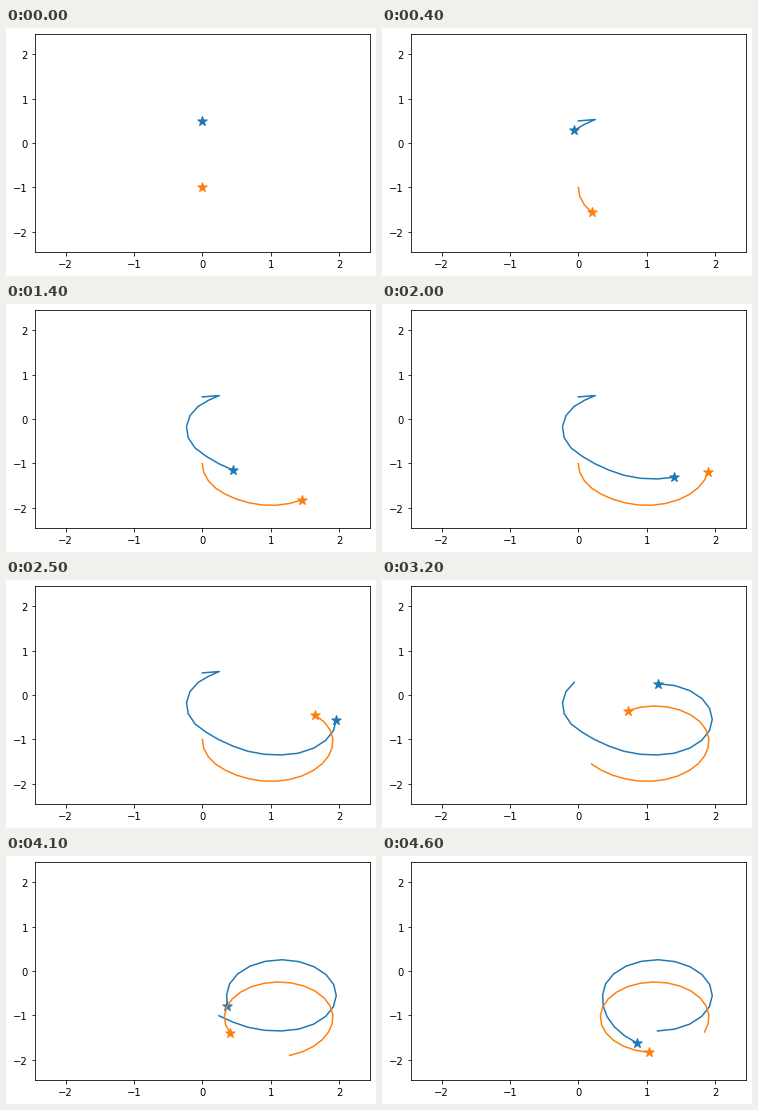
Animation, 370 px wide and 248 px high, one loop 4.8 s. Source, as a matplotlib script:

```python
import numpy as np
import matplotlib.pyplot as plt
from matplotlib.animation import FuncAnimation
from matplotlib.transforms import Affine2D

WIDTH, HEIGHT, DPI = 370, 248, 72
FRAME_MS, LOOP_MS, STEP_MS = 100, 4800, 140
STEPS, TAIL = 33, 20
LIMIT = 2.45

# (step, heading in degrees, speed): the turn rate is constant between keys.
BLUE = [(0, 7, .25), (1, 214, .18), (2, 222, .215), (4, 258, .255),
        (7, 311, .25), (10, 332, .25), (13, 369, .25), (27, 620, .25),
        (32, 678, .25)]
ORANGE = [(0, -84, .2), (3, -44, .2), (6, -14, .2), (14, 87, .2),
          (32, 347, .2)]


def walk(start, keys):
    """Add up steps along a heading that turns from key to key."""
    at, heading, speed = np.transpose(keys)
    steps = np.arange(STEPS)
    angle = np.radians(np.interp(steps, at, heading))
    moves = np.interp(steps, at, speed) * np.array([np.cos(angle), np.sin(angle)])
    return np.cumsum(np.vstack([start, moves.T]), axis=0)


# The small margin keeps the pixel size from rounding down.
fig = plt.figure(figsize=((WIDTH + .01) / DPI, (HEIGHT + .01) / DPI), dpi=DPI,
                 facecolor="white")
ax = fig.add_axes([28.9 / WIDTH, 24.2 / HEIGHT, 334.8 / WIDTH, 217.44 / HEIGHT])
ax.set(xlim=(-LIMIT, LIMIT), ylim=(-LIMIT, LIMIT),
       xticks=range(-2, 3), yticks=range(-2, 3))
for label in ax.get_xticklabels() + ax.get_yticklabels():
    label.set_transform(label.get_transform() + Affine2D().translate(0, -1))

walkers = []
for start, keys, color in (((0, .5), BLUE, "C0"), ((0, -1), ORANGE, "C1")):
    path = walk(start, keys)
    line, = ax.plot([], [], color=color, lw=1.5)
    star = ax.scatter(*path[0], s=100, marker="*", color=color)
    walkers.append((path, line, star))


def draw(frame):
    step = (frame * FRAME_MS + FRAME_MS // 2) // STEP_MS
    for path, line, star in walkers:
        line.set_data(*path[max(0, step - TAIL):step + 1].T)
        star.set_offsets(path[step:step + 1])
    return [artist for walker in walkers for artist in walker[1:]]


anim = FuncAnimation(fig, draw, frames=LOOP_MS // FRAME_MS, interval=FRAME_MS,
                     repeat=True, repeat_delay=0)
plt.show()
```
